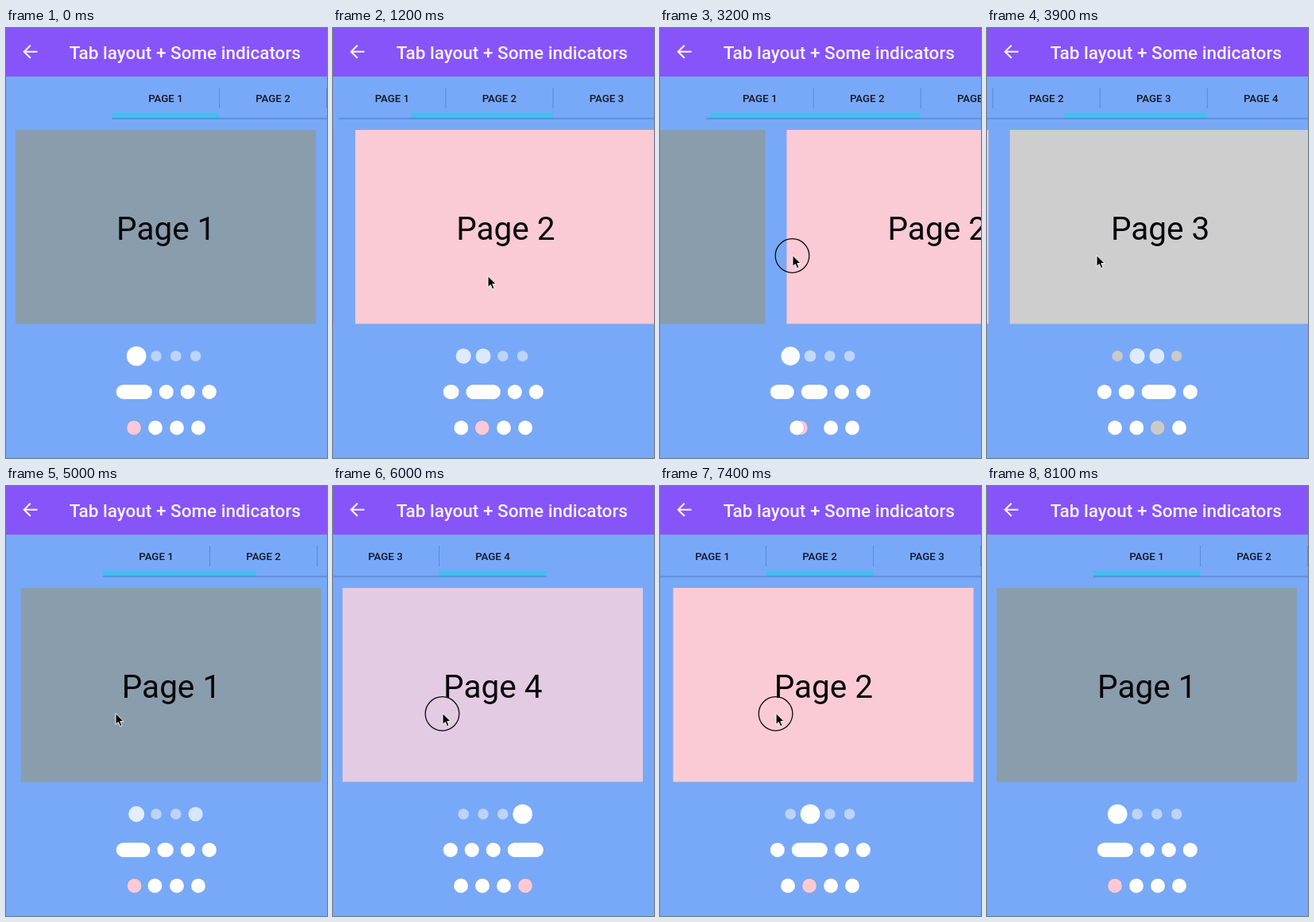
An HTML page that plays this animation: 404 px wide and 540 px high, repeating every 8200 ms.

```html
<!DOCTYPE html>
<html lang="en">
<head>
<meta charset="utf-8">
<title>Tab layout and indicators</title>
<style>
html, body { margin: 0; width: 100%; height: 100%; overflow: hidden; background: #78a9f8; }
svg { display: block; width: 404px; height: 540px; }
text { font-family: Roboto, sans-serif; text-anchor: middle; }
.title { font-size: 22.5px; font-weight: 500; fill: #f8f3ff; }
.tab { font-size: 13.3px; font-weight: 500; fill: #13172a; }
.page { font-size: 40.5px; fill: #07070b; }
.dot { stroke: #4f78bb; stroke-opacity: .5; stroke-width: .6; }
</style>
</head>
<body>
<svg id="stage" viewBox="0 0 404 540">
  <rect width="404" height="540" fill="#78a9f8"/>
  <rect width="404" height="61" fill="#8754f9"/>
  <path d="M39.5 29.8H23M30.8 21.8L22.8 29.8L30.8 37.8" fill="none" stroke="#f8f3ff" stroke-width="2.1"/>
  <text class="title" x="225.3" y="38.6">Tab layout + Some indicators</text>
</svg>
<script>
const LOOP = 8200, STEP = 100, SWIPE = 500, LAG = 22, SPAN = 405, TAB = 135;
const PICK = 146, FADE = 390;   // selection moment within a swipe, dot resize time
const COLORS = ['#8a9dac', '#facbd5', '#cecece', '#e3cbe3'];
const FORWARD = 8;              // this many swipes go forward, the rest go back
const STARTS = [863, 1390, 1918, 2467, 3016, 3565, 4097, 4628, 5400, 6000, 6860, 7390];

const stage = document.getElementById('stage');
const clamp = v => Math.max(0, Math.min(1, v));
const mix = (a, b, k) => a + (b - a) * k;
const ramp = (t, from, to) => clamp((t - from) / (to - from));
const smooth = k => k * k * (3 - 2 * k);
const ease = u => 1 - (1 - clamp(u) ** 1.5) ** 4;
const four = make => [0, 1, 2, 3].map(make);

function set(el, attrs) {
  for (const k in attrs) el.setAttribute(k, attrs[k]);
  return el;
}
function add(tag, attrs, parent = stage, label = '') {
  const el = set(document.createElementNS('http://www.w3.org/2000/svg', tag), attrs);
  el.textContent = label;
  return parent.appendChild(el);
}
const move = (el, x, y = 0) => el.setAttribute('transform', `translate(${x} ${y})`);

const bar = add('rect', { y: 106.5, height: 7.3, fill: '#45bdf0' });
const strip = add('g', {});
add('rect', { y: 112.7, width: TAB * 4, height: 2, fill: '#2c4c96', opacity: .3 }, strip);
four(i => {
  add('text', { class: 'tab', x: TAB * (i + .5), y: 93 }, strip, `PAGE ${i + 1}`);
  if (i) add('rect', { x: TAB * i - .5, y: 75, width: 1, height: 26, fill: '#2c4c96', opacity: .35 }, strip);
});
const pages = four(i => {
  const g = add('g', {});
  add('rect', { x: 12, y: 128, width: 378, height: 243.5, fill: COLORS[i] }, g);
  add('text', { class: 'page', x: 201.3, y: 266 }, g, `Page ${i + 1}`);
  return g;
});
const scaled = four(i => add('circle', { cx: 164.2 + 24.8 * i, cy: 412 }));
const pills = four(() => add('rect', { class: 'dot', y: 447.7, height: 18.6, rx: 9.3, fill: '#fff' }));
const swapped = four(() => add('circle', { class: 'dot', cy: 502, r: 9.2 }));
const ring = add('circle', { r: 21.3, fill: 'none', stroke: '#0c0c0c', 'stroke-width': 1.3 });
const arrow = add('path', {
  d: 'M0 0V14L3.3 11L5.6 16.3L8 15.2L5.8 10.1H10.2Z',
  fill: '#000', stroke: '#fff', 'stroke-width': 1, 'stroke-linejoin': 'round'
});

const dirOf = n => n < FORWARD ? 1 : -1;
const pageAfter = n => (n < FORWARD ? n + 1 : 2 * FORWARD - n - 1) % 4;

function swipeAt(t) {
  const n = STARTS.filter(s => s <= t).length - 1;
  const dir = dirOf(n), to = pageAfter(n);
  const from = n < 0 ? to : (to - dir + 4) % 4;
  return { n, dir, from, to, age: n < 0 ? LOOP : t - STARTS[n] };
}

function drawPages({ from, to, dir, age }) {
  const e = ease(age / SWIPE);
  pages.forEach((g, i) => {
    move(g, i === to ? dir * SPAN * (1 - e) : i === from ? -dir * SPAN * e : 2 * SPAN);
  });
}

function drawTabs(pos, base, f) {
  const left = 133.5 - TAB * pos;
  const a = base + f ** 6, b = base + 2 - (1 - f) ** 6;
  move(strip, left);
  set(bar, { x: left + TAB * a, width: TAB * (b - a) });
}

function drawDots({ from, to, age }, pos, base, f) {
  const k = ramp(age, PICK, PICK + FADE);
  const grey = (age < PICK ? from : to) === 2;
  scaled.forEach((el, i) => {
    const on = i === to ? k : i === from ? 1 - k : 0;
    const plain = on === 0 && grey;
    set(el, { r: mix(6.8, 12.3, on), fill: plain ? '#c9c9c9' : '#fff', 'fill-opacity': plain ? 1 : mix(.5, 1, on) });
  });

  let x = 138.5;
  pills.forEach((el, i) => {
    const width = 18.6 + 27 * Math.max(0, 1 - Math.abs(i - pos));
    set(el, { x, width });
    x += width + 8.4;
  });

  // the tinted circle trades places with its right neighbour
  const shift = smooth(f);
  swapped.forEach((el, i) => {
    const at = i === base ? i + shift : i === base + 1 ? i - shift : i;
    set(el, { cx: 161 + 27 * at, fill: i !== base ? '#fff' : grey ? '#cacaca' : '#fcc9d6' });
  });
}

function drawPointer(t, { n, dir, age }) {
  const early = 1 - ramp(t, 1200, 1700);
  const right = 315, left = 138 + 57 * early;
  const [start, end] = dir > 0 ? [right, left] : [left, right];
  let x = mix(start, end, ramp(age, 0, 220));
  if (n < 0) x = mix(425, right, ramp(t, 0, STARTS[0]));
  else if (dirOf(n + 1) === dir && n + 1 < STARTS.length) x = mix(x, start, ramp(age, 340, 380));
  x = mix(x, 425, ramp(t, 7750, 8050));
  const y = 285.5 + 26 * early;
  move(arrow, x, y);
  move(ring, x - .5, y + .5);
  const held = STARTS.some(s => t > s - 70 && t < s + 210);
  ring.style.display = held ? '' : 'none';
}

function draw(t) {
  const s = swipeAt(t);
  const pos = mix(s.from, s.to, ease((s.age - LAG) / SWIPE));
  const base = Math.floor(pos), f = pos - base;
  drawPages(s);
  drawTabs(pos, base, f);
  drawDots(s, pos, base, f);
  drawPointer(t, s);
}

const begin = performance.now();
function tick() {
  const t = (performance.now() - begin) % LOOP;
  draw(Math.floor(t / STEP) * STEP);
  requestAnimationFrame(tick);
}
tick();
</script>
</body>
</html>
```
